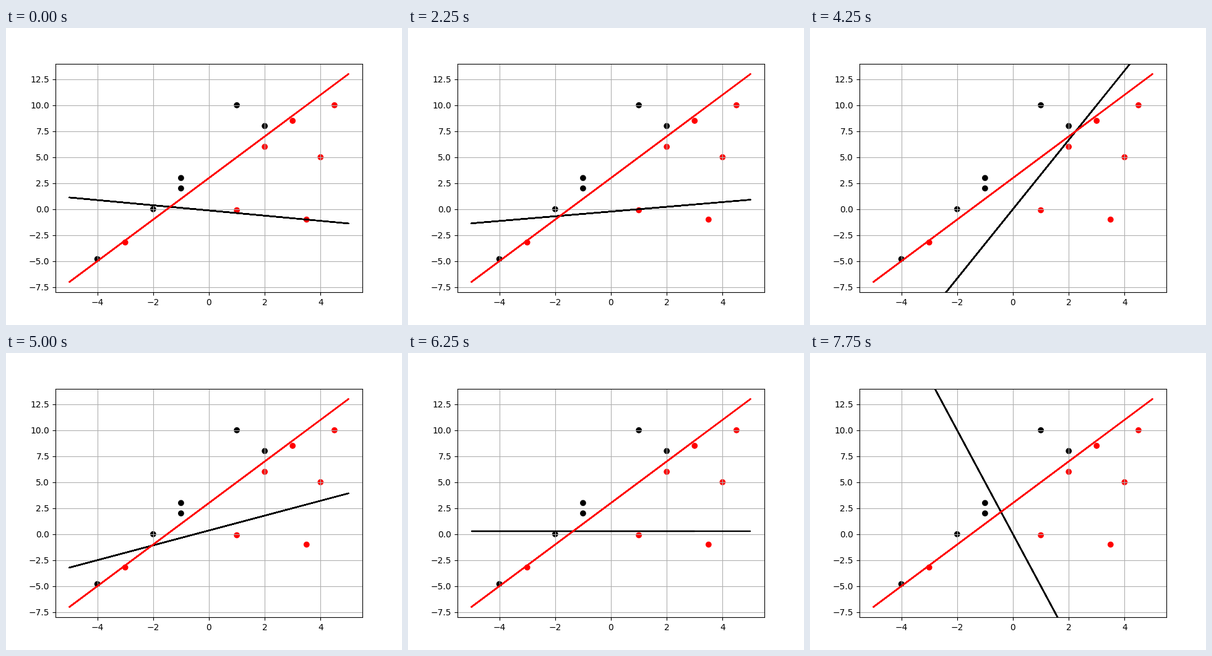
A matplotlib script that plays this animation: 640 px wide and 480 px high, repeating every 8 s.

```python
import numpy as np
import matplotlib.pyplot as plt
from matplotlib.animation import FuncAnimation

STEPS = 32
INTERVAL = 250

ABOVE = [(2, 8), (1, 10), (-1, 3), (-1, 2), (-2, 0), (-4, -4.8)]
BELOW = [(2, 6), (1, -0.1), (3, 8.5), (4, 5), (3.5, -1), (4.5, 10), (-3, -3.2)]

points = np.array(ABOVE + BELOW, dtype=float)
labels = np.repeat([1, -1], [len(ABOVE), len(BELOW)])

# lines run back and forth over themselves, which hardens their edges
sweep = np.array([-5, 5] * 2 + [-5, 3] * 2)


def train(steps):
    """Perceptron weights (x, y, bias) after each correction."""
    inputs = np.column_stack([points, np.ones(len(points))])
    w = np.zeros(3)
    history = []
    while len(history) < steps:
        for p, label in zip(inputs, labels):
            if label * (w @ p) <= 0:
                w = w + label * p
                history.append(w)
    return history[:steps]


def boundary(w, x):
    a, b, c = w
    if abs(b) < 1e-6:
        b = 1e-6  # nearly vertical
    return -(a * x + c) / b


weights = train(STEPS)

fig, ax = plt.subplots(figsize=(6.4, 4.8), dpi=100)
ax.set_xlim(-5.5, 5.5)
ax.set_ylim(-8, 14)
ax.grid(True)
ax.scatter(*points.T, c=["black" if label > 0 else "red" for label in labels])

guess, = ax.plot([], [], color="black")
ax.plot(sweep, 2 * sweep + 3, color="red")


def update(i):
    guess.set_data(sweep, boundary(weights[i], sweep))
    return guess,


anim = FuncAnimation(fig, update, frames=STEPS, interval=INTERVAL,
                     repeat=True, repeat_delay=0)
plt.show()
```
